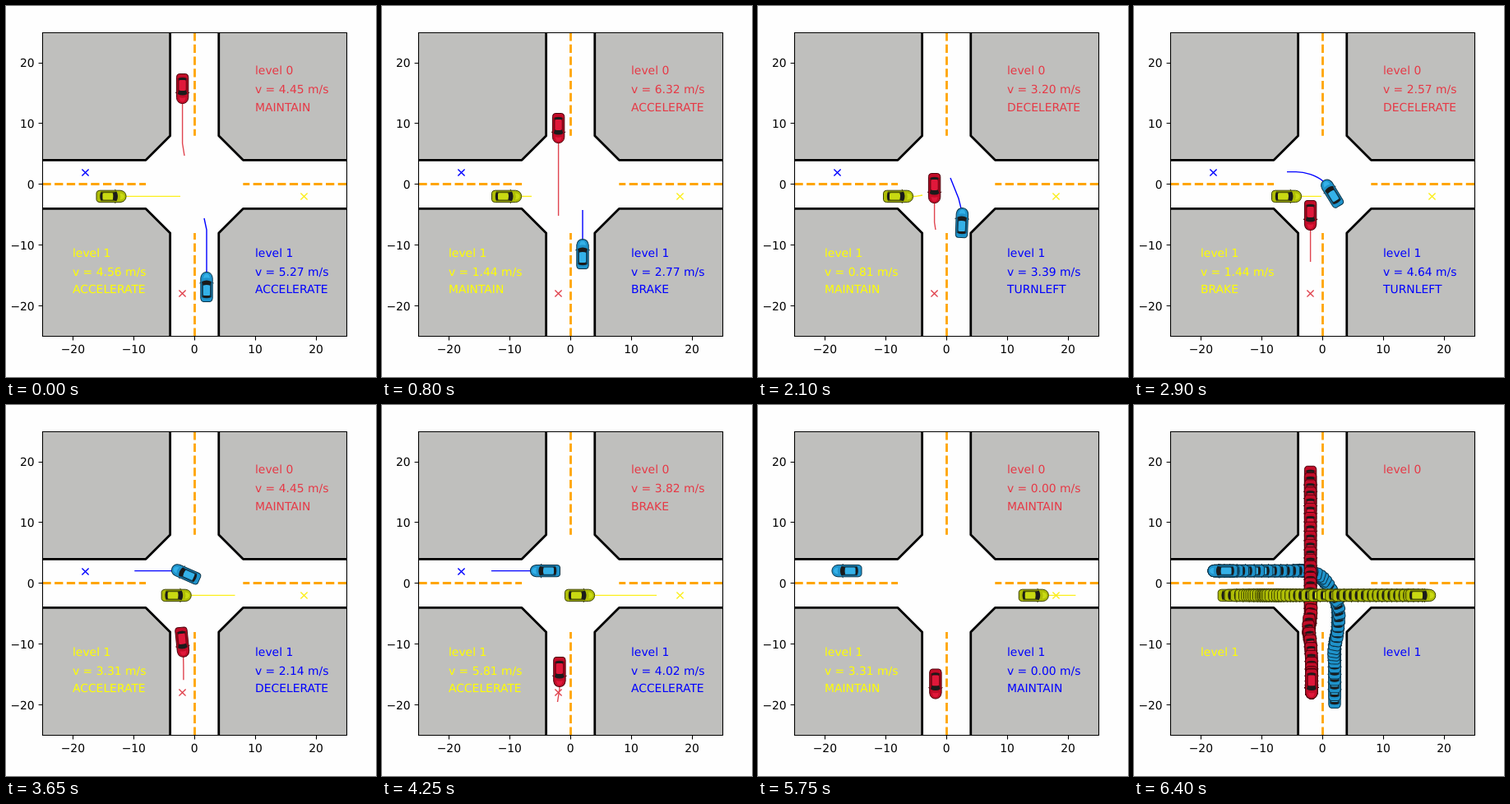
Recreate the animation shown at these times as an HTML page. Size 450 px wide and 451 px high, loop 8.4 s.

```html
<!DOCTYPE html>
<html lang="en">
<head>
<meta charset="utf-8">
<title>Intersection simulation</title>
<style>
  html, body { margin: 0; width: 100%; height: 100%; overflow: hidden; background: #fefefe; }
  svg { display: block; width: 450px; height: 451px; }
  text { font: 13.89px "DejaVu Sans", sans-serif; white-space: pre; text-rendering: geometricPrecision; }
</style>
</head>
<body>
<svg id="stage" viewBox="0 0 450 451">
  <rect width="450" height="451" fill="#fefefe"/>
  <g id="scene"></g>
  <g id="goals" fill="none" stroke-width="1.4"></g>
  <g id="plans" fill="none" stroke-width="1.4"></g>
  <g id="cars"></g>
  <g id="labels"></g>
</svg>
<script>
const $ = id => document.getElementById(id);
const SCALE = 7.392, LOOP = 8400;
const px = x => 229.2 + x * SCALE;
const py = y => 216.9 - y * SCALE;
const snap = v => Math.floor(v) + 0.5;

// Start time of every simulation step after the first; the last one shows the trails.
const TIMES = [
  100, 250, 450, 600, 800, 950, 1100, 1250, 1400, 1600, 1750, 1900, 2100, 2250,
  2450, 2600, 2750, 2900, 3050, 3200, 3300, 3450, 3650, 3800, 3950, 4100, 4250, 4450,
  4600, 4700, 4800, 4900, 5000, 5100, 5200, 5350, 5450, 5600, 5700, 5750, 5850, 6000,
  6100, 6400
];
const LAST = TIMES.length - 1;
const KEYS = [-1, 0, 5, 13, 18, 27, 35, 43];

const ACTIONS = {
  M: ['MAINTAIN', 0], A: ['ACCELERATE', 0.625], D: ['DECELERATE', -0.625],
  B: ['BRAKE', -1.25], L: ['TURNLEFT', 0], R: ['TURNRIGHT', 0], S: ['MAINTAIN', -99]
};

// In drawing order. route: one piece per key interval plus a tail;
// look: planning distance at each key
const CARS = [
  {
    level: 1, color: '#0000ff', line: '#0000ff', goal: [-18, 2], at: [10, -12],
    paint: { body: '#1f93cb', roof: '#34b1e8', shade: '#10405a', edge: '#0b3348' },
    v0: 5.269,
    acts: 'A MDDMB DRMMAMAL LALAL LDBLDMAAA MMMMAAAD DBBSMMMM',
    route: ['M244 350.4V341.5', 'V301.5', 'C244 285 248 280 248 263.5',
      'C249 250 247 238 240.5 227.5', 'C231 212 222 201.6 198.5 201.6', 'H130', 'H108', 'H60'],
    look: [84, 54, 60, 60, 65, 44, 40],
    plans: ['V272L241 258', 'V248', 'L247 246L244 234L234 209',
      'L230 213C222 206 208 201.6 197 201.6H186', 'H133', 'H87']
  },
  {
    level: 0, color: '#e63946', line: '#e0444f', goal: [-2, -18], at: [10, 18],
    paint: { body: '#c20c28', roof: '#e0183a', shade: '#7d0616', edge: '#4a030c' },
    v0: 4.449,
    acts: 'M MAMAA MDDMDMDD AMMDD ARAAMALMB DBBBMMMM MMMMMMMM',
    route: ['M214.6 92.3V100.5', 'V148.5', 'V221.5', 'V254.5',
      'C214.6 264 213 264 213 272C213 283 215.9 288 215.9 324.5', 'V339', '', 'V385'],
    look: [82, 106, 51, 57, 37, 0, 0],
    plans: ['V167L217 182', 'V255', 'V263L216 272', 'V311', 'V345L213.5 361', '']
  },
  {
    level: 1, color: '#ffff00', line: '#fbee1c', goal: [18, -2], at: [-20, -12],
    paint: { body: '#aebd06', roof: '#c9da12', shade: '#4d5404', edge: '#3d4302' },
    v0: 4.5625,
    acts: 'A BDDDM MMMADDMM MAAAB AMAMAAAAA DDDMMMMB AMADMDMS',
    route: ['M120.2 231.4H128', 'H151.5', 'H170.5', 'H185.5', 'H240.5', 'H303', 'H348.7', 'H400'],
    look: [84, 30, 30, 43, 94, 53, 50],
    plans: ['H212', 'H182', 'H192L200 230', 'H228', 'H334', 'H355']
  }
];

function makePath(d) {
  const p = document.createElementNS('http://www.w3.org/2000/svg', 'path');
  p.setAttribute('d', d);
  return p;
}

// Integrate the speeds, then fit each interval to its piece of the route.
function prepare(car) {
  car.acts = car.acts.replace(/ /g, '');
  car.v = [car.v0];
  for (let k = 1; k <= LAST; k++) {
    car.v[k] = Math.max(0, car.v[k - 1] + ACTIONS[car.acts[k]][1]);
  }
  const ends = car.route.map((_, i) => makePath(car.route.slice(0, i + 1).join('')).getTotalLength());
  car.path = makePath(car.route.join(''));
  car.dist = { [-1]: 0, 0: ends[0] };
  for (let j = 1; j < KEYS.length - 1; j++) {
    const a = KEYS[j], b = KEYS[j + 1], run = [0];
    for (let k = a + 1; k <= b; k++) run.push(run[run.length - 1] + car.v[k - 1] + car.v[k]);
    const total = run[run.length - 1] || 1;
    run.forEach((r, i) => { car.dist[a + i] = ends[j - 1] + (ends[j] - ends[j - 1]) * r / total; });
  }
}

function pose(car, k) {
  const s = car.dist[k], at = d => car.path.getPointAtLength(Math.max(0, d));
  const p = at(s), a = at(s - 0.5), b = at(s + 0.5);
  return { x: p.x, y: p.y, turn: Math.atan2(b.y - a.y, b.x - a.x) * 180 / Math.PI };
}

function carShape(car, k) {
  const { x, y, turn } = pose(car, k), c = car.paint;
  return `<g transform="translate(${x} ${y}) rotate(${turn})">
    <path d="M4.5-8.6L6-6M4.5 8.6L6 6" stroke="${c.edge}"/>
    <path d="M-18-4Q-17.7-7-14-7.2H11Q17.8-6.4 18.1 0Q17.8 6.4 11 7.2H-14Q-17.7 7-18 4Z" fill="${c.body}" stroke="${c.edge}"/>
    <path d="M-12.5-5.9H6V5.9H-12.5Q-15 0-12.5-5.9Z" fill="${c.shade}"/>
    <path d="M-12.5-4.9Q-14.6 0-12.5 4.9L-10.3 4V-4Z" fill="#1b1b1b"/>
    <rect x="-10.5" y="-4.1" width="13" height="8.2" rx="1.5" fill="${c.roof}"/>
    <path d="M2-4.2L6.5-5.9Q9.6 0 6.5 5.9L2 4.2Q3.2 0 2-4.2Z" fill="#1b1b1b"/>
    <path d="M10.5-4Q16-3.4 16 0Q16 3.4 10.5 4Q12 0 10.5-4Z" fill="${c.roof}"/>
  </g>`;
}

function planShape(car, k) {
  if (!car.v[k]) return '';
  const p = pose(car, k), key = KEYS.indexOf(k) - 1;
  let d = `M${p.x} ${p.y}`;
  if (key >= 0 && key < car.plans.length) {
    d += car.plans[key];
  } else {
    let j = 1;
    while (KEYS[j + 1] < k) j++;
    const f = (k - KEYS[j]) / (KEYS[j + 1] - KEYS[j]);
    const reach = car.look[j - 1] * (1 - f) + car.look[j] * f;
    for (let i = 1; i <= 10; i++) {
      const q = car.path.getPointAtLength(car.dist[k] + reach * i / 10);
      d += `L${q.x} ${q.y}`;
    }
  }
  return `<path d="${d}" stroke="${car.line}"/>`;
}

// Baselines sit on whole pixels; the speed line rounds because its slash descends.
function labelShape(car, k) {
  const x = Math.floor(px(car.at[0]));
  const base = i => py(car.at[1] - 3 * i);
  const line = (s, y) => `<text x="${x}" y="${y}" fill="${car.color}">${s}</text>`;
  let out = line(`level ${car.level}`, Math.floor(base(0)));
  if (k <= LAST) {
    out += line(`v = ${car.v[k].toFixed(2)} m/s`, Math.round(base(1)));
    out += line(ACTIONS[car.acts[k]][0], Math.floor(base(2)));
  }
  return out;
}

function drawScene() {
  const pts = list => list.map(([x, y]) => `${px(x)},${py(y)}`).join(' ');
  let out = '';
  for (const sx of [-1, 1]) for (const sy of [-1, 1]) {
    const edge = [[25, 4], [8, 4], [4, 8], [4, 25]].map(([x, y]) => [x * sx, y * sy]);
    out += `<polygon points="${pts([...edge, [25 * sx, 25 * sy]])}" fill="#bfbfbd"/>
      <polyline points="${pts(edge)}" fill="none" stroke="#000" stroke-width="2.8" stroke-linejoin="round"/>`;
  }
  const cx = snap(px(0)), cy = snap(py(0));
  for (const s of [-1, 1]) {
    out += `<path d="M${px(25 * s)} ${cy}H${px(8 * s)}M${cx} ${py(25 * s)}V${py(8 * s)}"
      fill="none" stroke="#ffa500" stroke-width="2.8" stroke-dasharray="10.28 4.44"/>`;
  }
  const [l, r, t, b] = [px(-25), px(25), py(25), py(-25)].map(snap);
  out += `<path d="M${l} ${t}H${r}V${b}H${l}Z" fill="none" stroke="#000" stroke-width="1.1"/>`;
  for (let n = -20; n <= 20; n += 10) {
    const name = String(n).replace('-', '\u2212');
    out += `<path d="M${snap(px(n))} ${b}v4.9M${l} ${snap(py(n))}h-4.9" stroke="#000" stroke-width="1.1"/>
      <text x="${px(n)}" y="422" text-anchor="middle">${name}</text>
      <text x="34.7" y="${Math.round(py(n) + 5.1)}" text-anchor="end">${name}</text>`;
  }
  $('scene').innerHTML = out;
  $('goals').innerHTML = CARS.map(c =>
    `<path d="M${snap(px(c.goal[0])) - 4.1} ${snap(py(c.goal[1])) - 4.1}l8.2 8.2m0-8.2l-8.2 8.2" stroke="${c.line}"/>`).join('');
}

function drawStep(k) {
  const done = k > LAST;
  const each = fn => CARS.map(c => fn(c, k)).join('');
  $('goals').style.display = done ? 'none' : '';
  $('plans').innerHTML = done ? '' : each(planShape);
  $('labels').innerHTML = each(labelShape);
  $('cars').innerHTML = each(car => {
    let trail = '';
    for (let i = done ? -1 : k; i <= Math.min(k, LAST); i++) trail += carShape(car, i);
    return trail;
  });
}

let shown = -1;
function render(t) {
  const k = TIMES.filter(s => s <= t).length;
  if (k !== shown) drawStep(shown = k);
}

CARS.forEach(prepare);
drawScene();
render(0);
const start = performance.now();
function tick() {
  render((performance.now() - start) % LOOP);
  requestAnimationFrame(tick);
}
requestAnimationFrame(tick);
</script>
</body>
</html>
```
